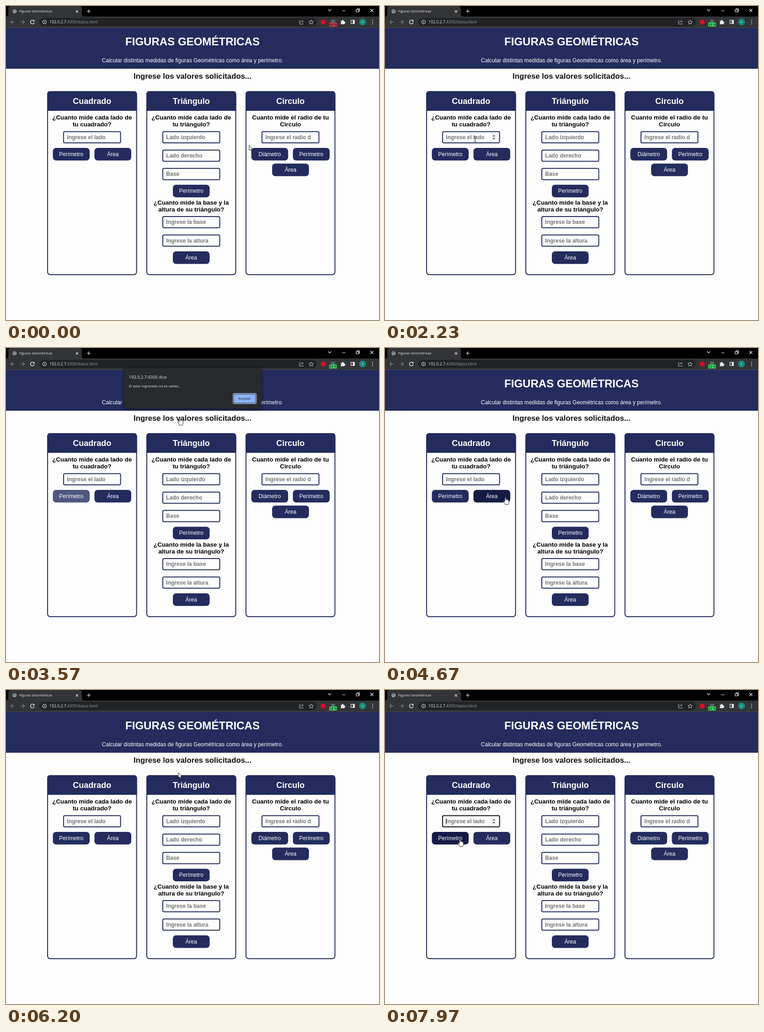
Recreate the animation shown at these times as an HTML page. Size 816 by 686 pixels, loop 8000 ms.

```html
<!DOCTYPE html>
<html lang="es">
<head>
<meta charset="utf-8">
<title>Figuras Geométricas</title>
<style>
  html, body { margin: 0; width: 100%; height: 100%; overflow: hidden; background: #fdfdfd; }
  svg { display: block; }
  :root { --navy: #232c5d; --dark: #151b45; --light: #4f5680; }
  text { font-family: "Liberation Sans", Arial, sans-serif; font-size: 12.05px; }
  .ui { font-family: "Open Sans", "Noto Sans", sans-serif; fill: #e8eaed; }
  .mid { text-anchor: middle; }
  .bold { font-weight: bold; }
  .white { fill: #fff; }
  .hint { font-weight: bold; fill: #757575; }
  .navy { fill: var(--navy); }
  .line { fill: none; stroke: #e8eaed; stroke-width: 1.2; }
  .box { fill: #fdfdfd; stroke: var(--navy); stroke-width: 2; }

  .step { animation: 8s step-end infinite; }
  #cursor { animation: move 8s ease-in-out infinite; }
  #arrow { animation-name: arrow; }
  #beam { animation-name: beam; }
  #hand { animation-name: hand; }
  #dialog { animation-name: dialog; }
  #perimeter { animation-name: perimeter; }
  #area { animation-name: area; }
  #spinner { animation-name: spinner; }
  #side { animation-name: focus; }
  #caret { animation-name: caret; }
  .load { animation-name: load; }

  @keyframes move {
    0% { transform: translate(532px, 304px); }
    16.25% { transform: translate(78px, 219px); }
    27.875% { transform: translate(197px, 291px); }
    34.5%, 39.5% { transform: translate(155px, 327px); }
    44.625% { transform: translate(379px, 154px); animation-timing-function: ease-out; }
    48%, 50.6% { transform: translate(520px, 111px); }
    58.375%, 62% { transform: translate(263.5px, 327px); }
    69%, 72.8% { transform: translate(520px, 111px); }
    77.5% { transform: translate(377px, 181px); }
    84.5%, 87% { transform: translate(190px, 289px); }
    94%, 100% { transform: translate(164px, 327px); }
  }
  @keyframes arrow {
    0%, 45.25%, 64.4% { opacity: 1; }
    26.6%, 57%, 82.5%, 100% { opacity: 0; }
  }
  @keyframes beam {
    0%, 32.5%, 89.4%, 100% { opacity: 0; }
    26.6%, 82.5% { opacity: 1; }
  }
  @keyframes hand {
    0%, 45.25%, 64.4% { opacity: 0; }
    32.5%, 57%, 89.4%, 100% { opacity: 1; }
  }
  @keyframes dialog {
    0%, 50.4%, 72.5%, 100% { opacity: 0; }
    40%, 61.25% { opacity: 1; }
  }
  @keyframes perimeter {
    0%, 50.4% { fill: var(--navy); }
    33.5%, 91.2%, 100% { fill: var(--dark); }
    38.75% { fill: var(--light); }
  }
  @keyframes area {
    0%, 72.5%, 100% { fill: var(--navy); }
    57.3% { fill: var(--dark); }
    60.5% { fill: var(--light); }
  }
  @keyframes spinner {
    0%, 32.5% { opacity: 0; }
    26.6%, 82.5%, 100% { opacity: 1; }
  }
  @keyframes focus {
    0% { stroke: var(--navy); }
    85.6%, 100% { stroke: #101114; }
  }
  @keyframes caret {
    0%, 91.9% { opacity: 0; }
    85.6%, 98.1%, 100% { opacity: 1; }
  }
  @keyframes load {
    0% { opacity: 1; }
    12.5%, 100% { opacity: 0; }
  }
</style>
</head>
<body>
<svg width="816" height="686" viewBox="0 0 816 686">
  <rect width="816" height="686" fill="#fdfdfd"/>

  <!-- Browser -->
  <rect width="816" height="24" fill="#000"/>
  <rect y="23" width="816" height="24" fill="#333436"/>
  <path d="M0 23Q5 23 5 18V6Q5 0 11 0H160Q166 0 166 6V18Q166 23 171 23Z" fill="#333436"/>
  <circle cx="18.7" cy="11.5" r="4.5" fill="#9aa0a6"/>
  <path d="M15 9.5q3 0 3 2t3 2M18 8q1 2 4 1" fill="none" stroke="#333436"/>
  <text class="ui" x="29" y="14.3" style="font-size:7.6px">Figuras Geométricas</text>
  <path class="line" d="M152.8 9.3l5 5m0-5l-5 5M177 11.5h8m-4-4v8"/>
  <path class="line" stroke-width="1" d="M704.5 7.5l3.5 3.5 3.5-3.5M735.5 10.5h7M766 8h5.5v5H766zM768 8V6.2h5.5v5h-2M797 6.5l6.5 6.5m0-6.5l-6.5 6.5"/>
  <path class="line" style="stroke:#85878a" d="M19.5 35H10.5m4-4l-4 4 4 4M31.5 35h9m-4-4l4 4-4 4"/>
  <path class="line" style="stroke-width:1.4" d="M61 32.2A4.2 4.2 0 1 0 61.8 36"/>
  <path d="M62.3 30v4h-4z" fill="#e8eaed"/>
  <rect x="73" y="26" width="607" height="18" rx="9" fill="#212224"/>
  <circle class="line" cx="84.3" cy="35" r="4" stroke-width="1"/>
  <path class="line" d="M84.3 34.3v3M84.3 32.4v1"/>
  <text class="ui" x="95" y="38.2" style="font-size:8.7px">192.0.2.7<tspan fill="#9aa0a6">:4300/datos.html</tspan></text>
  <path class="line" style="stroke:#b8babd;stroke-width:1" d="M644 32h-2v7.5h8v-2M644.5 37q0-4 5-4m-2-2.5l2.7 2.5-2.7 2.5"/>
  <path class="line" style="stroke:#d0d2d5;stroke-width:1" d="M667.5 30.4l1.4 3.1 3.4.4-2.5 2.3.7 3.4-3-1.7-3 1.7.7-3.4-2.5-2.3 3.4-.4z"/>
  <circle cx="694" cy="35" r="5.5" fill="#df0b20"/>
  <rect x="711" y="30" width="9" height="7" fill="#59636b"/>
  <g id="loads"></g>
  <path d="M732.5 32.5h2.5a1.6 1.6 0 1 1 3 0h2.5v2.5a1.6 1.6 0 1 1 0 3v2h-3a1.5 1.5 0 0 0-2.5 0h-2.5v-2.5a1.6 1.6 0 0 0 0-2.7z" fill="#e8eaed"/>
  <path d="M754 30.5h9v8.5h-9zM755.2 31.8v6h3.6v-6z" fill="#e8eaed" fill-rule="evenodd"/>
  <circle cx="780" cy="34.8" r="7.5" fill="#15897b"/>
  <text class="ui mid" x="780" y="37.8" style="font-size:8px">F</text>
  <path d="M802 31v.01M802 35v.01M802 39v.01" stroke="#e8eaed" stroke-width="2" stroke-linecap="round"/>

  <!-- Page -->
  <rect class="navy" y="47" width="816" height="90"/>
  <path d="M0 47.5H816" stroke="#45465a"/>
  <path d="M0 136.3H816" stroke="#1b2350"/>
  <text class="mid bold white" x="408" y="86.3" style="font-size:24.05px">FIGURAS GEOMÉTRICAS</text>
  <text class="mid white" x="408" y="123">Calcular distintas medidas de figuras Geométricas como área y perímetro.</text>
  <text class="mid bold" x="408" y="158.7" style="font-size:16.75px" fill="#111">Ingrese los valores solicitados...</text>
  <g id="cards"></g>
  <g id="spinner" class="step">
    <rect x="233.5" y="280" width="9" height="13.5" fill="#efefef"/>
    <path d="M235.5 285l2.6-3.2 2.6 3.2zM235.5 288.6l2.6 3.2 2.6-3.2z" fill="#505050"/>
  </g>
  <path id="caret" class="step" d="M133.6 280.3V293.5" stroke="#111"/>

  <g id="dialog" class="step">
    <rect x="258" y="44" width="301" height="88" rx="3" fill="#292a2d" style="filter:drop-shadow(0 1px 3px #0009)"/>
    <text class="ui" x="269" y="66.6" style="font-size:9.25px">192.0.2.7:4300 dice</text>
    <text class="ui" x="269" y="85.8" style="font-size:7.67px">El valor ingresado no es valido...</text>
    <rect x="497" y="99.5" width="50.5" height="22" rx="3" fill="#292a2d" stroke="#a9c7fa" stroke-width="1.4"/>
    <rect x="498.7" y="101.2" width="47.1" height="18.6" rx="2" fill="#8ab4f8"/>
    <text class="ui mid" x="522.2" y="113.3" style="font-size:7.7px;fill:#202124">Aceptar</text>
  </g>

  <g id="cursor" stroke="#111" stroke-width=".9" stroke-linejoin="round" fill="#fff">
    <path id="arrow" class="step" d="M0 0V11.2L2.6 8.8 4.3 12.7 6 12 4.4 8.2H7.8Z"/>
    <path id="beam" class="step" d="M-2.5-5.5H-.7L0-5 .7-5.5H2.5M0-5V5M-2.5 5.5H-.7L0 5 .7 5.5H2.5" fill="none"/>
    <path id="hand" class="step" d="M-1.2 1Q-1.2-.5 0-.5T1.2 1V5Q3-.2 3.6 5.2 5-.1 5.8 5.6 7.6 5 7.6 7V10Q7.4 12 6.3 13.3V15H-.8V13.3L-4 9Q-5 7-3.6 6.7L-1.2 8.6Z"/>
  </g>
</svg>
<script>
  const byId = id => document.getElementById(id);
  const text = (cls, x, y, label, size = 12.05) =>
    `<text class="${cls}" x="${x}" y="${y}" style="font-size:${size}px">${label}</text>`;

  const field = (x, y, label, id = "") =>
    `<rect id="${id}" class="box step" x="${x + 36}" y="${y + 1}" width="124.6" height="24.6" rx="2.5"/>` +
    text("hint", x + 43.3, y + 17.3, label);

  const button = (x, y, label, id = "") =>
    `<rect id="${id}" class="navy step" x="${x}" y="${y}" width="80.5" height="27.5" rx="7"/>` +
    text("mid white", x + 40.25, y + 17.7, label);

  const question = (x, y, lines) =>
    lines.map((line, i) => text("mid bold", x + 98.3, y + i * 15.3, line, 13.4)).join("");

  const card = (x, title, content) =>
    `<rect class="box" x="${x + 1}" y="187" width="194.6" height="400" rx="6"/>
     <path class="navy" d="M${x} 229V193q0-7 7-7h182.6q7 0 7 7v36z"/>` +
    text("mid bold white", x + 98.3, 214.3, title, 18.05) + content;

  const [square, triangle, circle] = [90, 307, 524];

  byId("cards").innerHTML =
    card(square, "Cuadrado",
      question(square, 248, ["¿Cuanto mide cada lado de", "tu cuadrado?"]) +
      field(square, 273.5, "Ingrese el lado", "side") +
      button(102.5, 310, "Perímetro", "perimeter") +
      button(193.5, 310, "Área", "area")) +
    card(triangle, "Triángulo",
      question(triangle, 248, ["¿Cuanto mide cada lado de", "tu triángulo?"]) +
      field(triangle, 273.5, "Lado izquierdo") +
      field(triangle, 313.7, "Lado derecho") +
      field(triangle, 353.8, "Base") +
      button(365, 390.5, "Perímetro") +
      question(triangle, 433.5, ["¿Cuanto mide la base y la", "altura de su triángulo?"]) +
      field(triangle, 459, "Ingrese la base") +
      field(triangle, 499.2, "Ingrese la altura") +
      button(365, 536, "Área")) +
    card(circle, "Circulo",
      question(circle, 248, ["Cuanto mide el radio de tu", "Circulo"]) +
      field(circle, 273.5, "Ingrese el radio d") +
      button(536.7, 310, "Diámetro") +
      button(627.6, 310, "Perímetro") +
      button(582.2, 344.3, "Área"));

  // One load reading per second.
  const loadColor = value => value > 60 ? "#e0344a" : value > 40 ? "#f08a3c" : "#3ddc68";
  byId("loads").innerHTML = [69, 46, 19, 25, 23, 20, 18, 22].map((value, i) =>
    `<g class="step load" style="animation-delay:${i - 8}s">
       <rect x="707" y="36.3" width="17" height="8.5" rx="1" fill="${loadColor(value)}"/>
       ${text("mid", 715.5, 43.3, value + " %", 7)}
     </g>`).join("");
</script>
</body>
</html>
```
